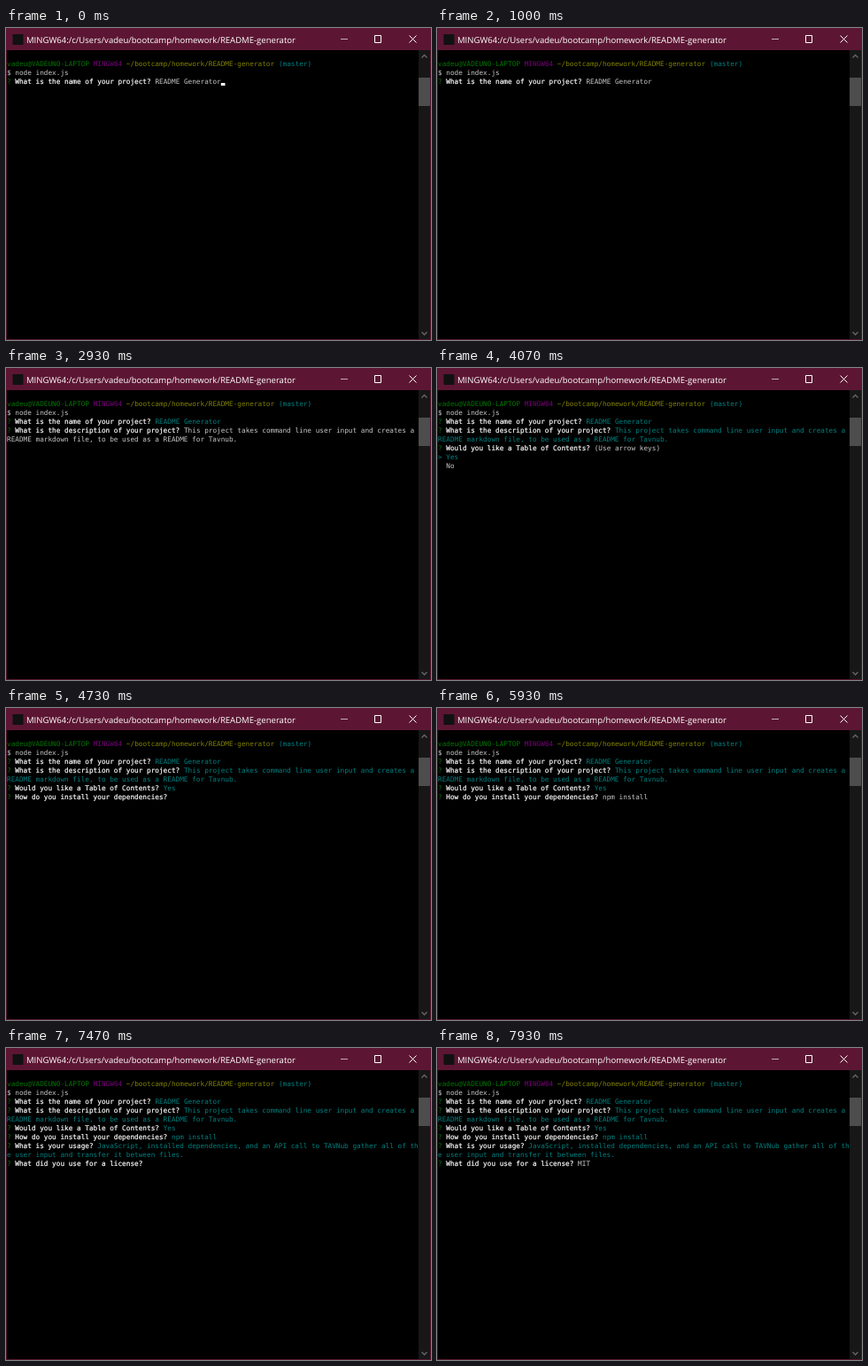
Write an HTML page that moves like this. It is 480 px wide and 352 px high and loops after 8 s.

```html
<!DOCTYPE html>
<html lang="en">
<head>
<meta charset="utf-8">
<title>Terminal prompt session</title>
<style>
  html, body { margin: 0; width: 100%; height: 100%; overflow: hidden; background: #000; }
  svg { display: block; width: 480px; height: 352px; }
  text { white-space: pre; text-rendering: geometricPrecision; }
  .title { font: 9.55px "Open Sans", sans-serif; fill: #fff; }
  #screen { font: 7.724px "DejaVu Sans Mono", monospace; }
  #screen .bright { stroke: #fff; stroke-width: .2; }
  .line { fill: none; stroke: #fff; stroke-width: 1; }
  .arrow { fill: none; stroke: #686868; stroke-width: 1.3; }
</style>
</head>
<body>
<svg viewBox="0 0 480 352">
  <rect width="480" height="352" fill="#000"/>
  <rect x="466" y="25" width="13" height="326" fill="#171717"/>
  <rect x="466" y="56" width="13" height="32" fill="#4d4d4d"/>
  <path class="arrow" d="M469.5 33.5l3-3 3 3M469.5 343l3 3 3-3"/>
  <rect x=".5" y=".5" width="479" height="351" fill="none" stroke="#541530"/>
  <rect width="480" height="25" fill="#5c1633"/>
  <rect x="7.5" y="7" width="12" height="12" fill="#111"/>
  <text class="title" x="23" y="16.5">MINGW64:/c/Users/vadeu/bootcamp/homework/README-generator</text>
  <path class="line" d="M378 12.5h8" opacity=".65"/>
  <path class="line" d="M416.5 8.5h7v8h-7zM455.5 8.5l8 8M463.5 8.5l-8 8"/>
  <g id="screen"></g>
</svg>
<script>
const LOOP = 8000, COLS = 100, CELL = 4.65, LEFT = 1, BASELINE = 43, ROW = 9.95;
const C = { green: '#007800', purple: '#780078', olive: '#808000', teal: '#008080',
            grey: '#c8c8c8', white: '#fff' };

// Each question is asked when the previous one is accepted.
const questions = [
  { ask: 'What is the name of your project?', answer: 'README Generator', typed: 0, accepted: 1130 },
  { ask: 'What is the description of your project?',
    answer: 'This project takes command line user input and creates a README markdown file, to be used as a README for Tavnub.',
    typed: 1330, accepted: 3200 },
  { ask: 'Would you like a Table of Contents?', answer: 'Yes', menu: true, accepted: 4730 },
  { ask: 'How do you install your dependencies?', answer: 'npm install', typed: 5070, accepted: 6000 },
  { ask: 'What is your usage?',
    answer: 'JavaScript, installed dependencies, and an API call to TAVNub gather all of the user input and transfer it between files.',
    typed: 6000, accepted: 7270 },
  { ask: 'What did you use for a license?', answer: 'MIT', typed: 7530, accepted: LOOP },
];
const cursorOn = [[0, 530], [6270, 6800]];

const screen = document.getElementById('screen');
let row, col;

function add(tag, attrs, content = '') {
  const node = document.createElementNS('http://www.w3.org/2000/svg', tag);
  for (const key in attrs) node.setAttribute(key, attrs[key]);
  node.textContent = content;
  screen.append(node);
}

function newline() { row++; col = 0; }

function print(content, fill) {
  while (content) {
    if (col === COLS) newline();
    const part = content.slice(0, COLS - col);
    add('text', { x: LEFT + col * CELL, y: BASELINE + row * ROW, fill,
                  class: fill === C.white ? 'bright' : '' }, part);
    col += part.length;
    content = content.slice(part.length);
  }
}

function draw(t, cursor) {
  screen.replaceChildren();
  row = col = 0;
  print('vadeu@VADEUNO-LAPTOP ', C.green);
  print('MINGW64 ', C.purple);
  print('~/bootcamp/homework/README-generator ', C.olive);
  print('(master)', C.teal);
  newline();
  print('$ node index.js', C.grey);
  for (const q of questions) {
    newline();
    print('? ', C.green);
    print(q.ask + ' ', C.white);
    if (t >= q.accepted) {
      print(q.answer, C.teal);
      continue;
    }
    if (q.menu) {
      print('(Use arrow keys)', C.grey);
      newline();
      print('> Yes', C.teal);
      newline();
      print('  No', C.grey);
    } else if (t >= q.typed) {
      print(q.answer, C.grey);
    }
    break;
  }
  if (cursor) {
    const y = Math.round(BASELINE + row * ROW) - 1;
    add('rect', { x: LEFT + col * CELL, y, width: CELL, height: 3, fill: C.white });
  }
}

const marks = [...questions.flatMap(q => [q.typed ?? 0, q.accepted]), ...cursorOn.flat()];
let shown = -1;

function tick() {
  const t = performance.now() % LOOP;
  const state = Math.max(...marks.filter(m => m <= t));
  if (state !== shown) {
    shown = state;
    draw(t, cursorOn.some(([from, to]) => t >= from && t < to));
  }
  requestAnimationFrame(tick);
}
tick();
</script>
</body>
</html>
```
